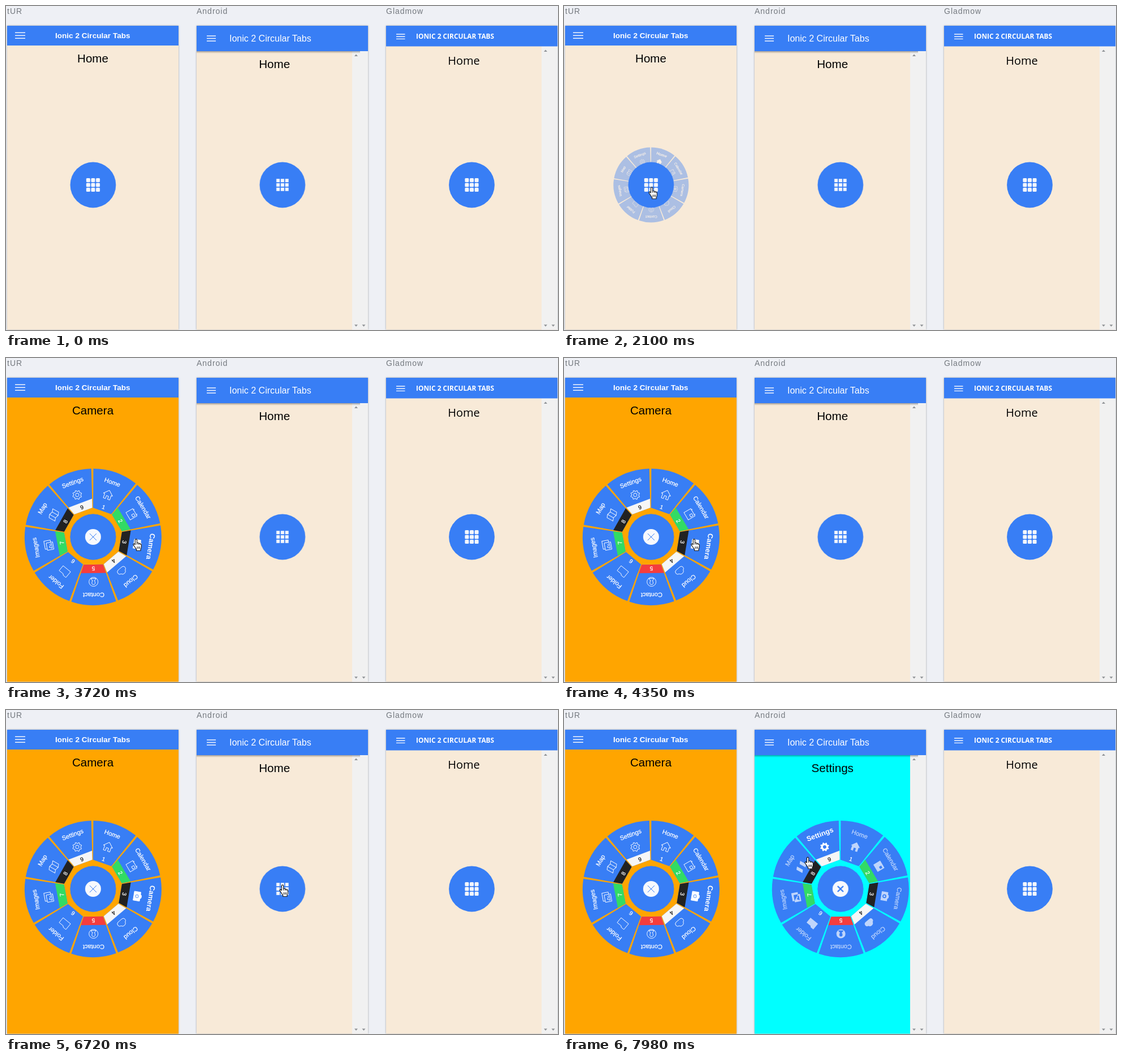
These frames come from a looping animation (976 by 574 pixels, 8 s). An HTML page:

```html
<!DOCTYPE html>
<html lang="en">
<head>
<meta charset="utf-8">
<title>Circular tabs</title>
<style>
html, body { margin: 0; width: 100%; height: 100%; overflow: hidden; background: #eef0f5; }
svg { display: block; width: 976px; height: 574px; }
text { font-family: "Liberation Sans", Arial, sans-serif; }
.name { font-size: 14px; letter-spacing: 1px; fill: #74797f; }
.phone { fill: #f8ead8; filter: drop-shadow(0 0 1.5px rgba(0, 0, 0, .35)); }
.bar, .disc, .slice { fill: #387ef5; }
.burger { stroke: #f2f6fe; fill: none; }
.title { fill: #fff; }
.head { font-size: 20.6px; text-anchor: middle; }
.open { font-family: "Open Sans", "Noto Sans", sans-serif; }
.scroll { fill: #f1f1f1; }
.arrow { fill: #8f9296; }
.grid { fill: #f3f6fc; }

.label, .num { fill: #fff; text-anchor: middle; }
.label { font-size: 11px; stroke: #fff; stroke-width: .25px; }
.num { font-size: 10px; stroke-width: .25px; }
.icon { fill: none; stroke: #fff; stroke-width: .9; stroke-linejoin: round; }
.mid .icon { fill: #fff; fill-rule: evenodd; stroke: none; }
.mid .idle { opacity: .68; }
.active .label { font-size: 12.6px; font-weight: 700; stroke: none; }
.active .icon { fill: #fff; fill-rule: evenodd; }

.wheel, .close, .was, .now, .hand { animation: 8s linear infinite; }
.close, .was, .now { animation-timing-function: step-end; }
.left .wheel { animation-name: wheel1; }
.left .close { animation-name: close1; }
.left .was { animation-name: was1; }
.left .now { animation-name: now1; }
.mid .wheel { animation-name: wheel2; }
.mid .close { animation-name: close2; }
.mid .was { animation-name: was2; }
.mid .now { animation-name: now2; }
.hand { animation-name: hand; }

@keyframes wheel1 {
  0%, 16.29%, 27.6%, 32.21% { transform: scale(.25); opacity: 0; }
  20.04%, 24.25%, 35.96%, 100% { transform: scale(1); opacity: 1; }
}
@keyframes wheel2 {
  0%, 70.81%, 83.9%, 87.6% { transform: scale(.25); opacity: 0; }
  74.56%, 80.85%, 91.35%, 100% { transform: scale(1); opacity: 1; }
}
@keyframes close1 {
  0%, 24.3% { visibility: hidden; }
  16.45%, 32.2%, 100% { visibility: visible; }
}
@keyframes close2 {
  0%, 80.9% { visibility: hidden; }
  70.85%, 87.7%, 100% { visibility: visible; }
}
@keyframes was1 { 0% { visibility: visible; } 46.5%, 100% { visibility: hidden; } }
@keyframes now1 { 0% { visibility: hidden; } 46.5%, 100% { visibility: visible; } }
@keyframes was2 { 0% { visibility: visible; } 97.875%, 100% { visibility: hidden; } }
@keyframes now2 { 0% { visibility: hidden; } 97.875%, 100% { visibility: visible; } }
@keyframes hand {
  0% { transform: translate(561px, -30px); }
  4% { transform: translate(561px, -30px); animation-timing-function: cubic-bezier(.35, .25, .4, 1); }
  13.9%, 16.4% { transform: translate(158px, 319px); }
  18%, 24.4% { transform: translate(157px, 320px); }
  27.4% { transform: translate(154px, 322px); }
  36% { transform: translate(154px, 322px); animation-timing-function: ease-in-out; }
  41.6% { transform: translate(230px, 321px); }
  57.6% { transform: translate(230px, 321px); animation-timing-function: ease-in-out; }
  67.5% { transform: translate(483px, 307px); }
  70.5% { transform: translate(489px, 310px); }
  91.25% { transform: translate(489px, 310px); animation-timing-function: ease-in-out; }
  95.25%, 100% { transform: translate(431px, 261px); }
}
</style>
</head>
<body>
<svg viewBox="0 0 976 574">
  <defs>
    <linearGradient id="shade" x2="0" y2="1">
      <stop stop-opacity=".32"/>
      <stop offset="1" stop-opacity="0"/>
    </linearGradient>
  </defs>

  <text class="name" x="2" y="13.5">tUR</text>
  <text class="name" x="337" y="13.5">Android</text>
  <text class="name" x="672" y="13.5">Gladmow</text>

  <g class="left">
    <rect class="phone" x="2" y="35" width="303" height="538.5"/>
    <text class="head" x="153.5" y="100">Home</text>
    <g class="now">
      <rect x="2" y="70" width="303" height="503.5" fill="#ffa500"/>
      <text class="head" x="153.5" y="100">Camera</text>
    </g>
    <rect class="bar" x="2" y="35" width="303" height="35"/>
    <path class="burger" stroke-width="1.6" d="M16 47.3h18M16 52.3h18M16 57.3h18"/>
    <text class="title" x="153.3" y="56.5" font-size="13.6" font-weight="700" text-anchor="middle">Ionic 2 Circular Tabs</text>
    <g id="tabs1" transform="translate(153.9 317)"></g>
  </g>

  <g class="mid">
    <rect class="phone" x="337" y="35" width="303" height="538.5"/>
    <text class="head" x="474.7" y="110">Home</text>
    <g class="now">
      <rect x="337" y="80" width="275" height="493.5" fill="#0ff"/>
      <text class="head" x="474.7" y="110">Settings</text>
    </g>
    <rect class="scroll" x="612" y="80" width="28" height="493.5"/>
    <rect x="337" y="80" width="289" height="4" fill="url(#shade)"/>
    <rect class="bar" x="337" y="35" width="303" height="45"/>
    <path class="burger" stroke-width="1.6" d="M355 53h16M355 57.5h16M355 62h16"/>
    <text class="title" x="395" y="63" font-size="16">Ionic 2 Circular Tabs</text>
    <path class="arrow" d="M616 89l3-3.5 3 3.5zM616 564.5l3 3.5 3-3.5zM629.5 564.5l3 3.5 3-3.5z"/>
    <g id="tabs2" transform="translate(488.8 317)"></g>
  </g>

  <g class="right">
    <rect class="phone" x="672" y="35" width="303" height="538.5"/>
    <text class="head open" x="809.5" y="103.5" style="font-size:20px;font-weight:500">Home</text>
    <rect class="scroll" x="947" y="71" width="28" height="502.5"/>
    <rect class="bar" x="672" y="35" width="303" height="36.5"/>
    <path class="burger" stroke-width="1.4" d="M690 50h15.5M690 54.2h15.5M690 58.4h15.5"/>
    <text class="title open" x="725" y="58" font-size="11.9" font-weight="700">IONIC 2 CIRCULAR TABS</text>
    <path class="arrow" d="M951 81l3-3.5 3 3.5zM951 564.5l3 3.5 3-3.5zM964.5 564.5l3 3.5 3-3.5z"/>
    <g id="tabs3" transform="translate(823.5 317)"></g>
  </g>

  <g class="hand">
    <path fill="#fff" stroke="#111" stroke-width="1.1" stroke-linejoin="round" d="M-1.6 1.5a1.6 1.6 0 0 1 3.2 0v5.3q2.6-.9 3 .7 2-.6 2.6.8 2.2-.3 2.2 1.6v3.6q0 2.5-1.3 3.9v2.9h-7.5v-2.4q-2-2.2-3-4.4l-2.4-3.4q-.6-1.9 1.3-2 1 .2 1.9 1.5z"/>
    <path fill="none" stroke="#111" stroke-width=".9" d="M1.6 6.8v3M4.6 7.5v2.5M7.2 8.3v2M2 13v4M4.3 13v4M6.5 13v4"/>
  </g>
</svg>
<script>
const byId = id => document.getElementById(id);
const ring = (r, y = 0) => `M${-r} ${y}a${r} ${r} 0 1 1 ${2 * r} 0a${r} ${r} 0 1 1 ${-2 * r} 0z`;

const gear = 'M' + Array.from({ length: 32 }, (_, i) => {
  const r = i % 4 < 2 ? 8 : 6.2, a = (i - .5) * Math.PI / 16;
  return `${(r * Math.sin(a)).toFixed(2)} ${(-r * Math.cos(a)).toFixed(2)}`;
}).join('L') + 'z';

const blue = '#387ef5', green = '#32db64', dark = '#222', light = '#f6f6f6', red = '#f53d3d';

const items = [
  ['Home', blue, 'M-8.5 0L0-8l8.5 8H6v8H2V2.5H-2V8H-6V0z'],
  ['Calendar', green, 'M-7.5-6.5h15v14h-15zM1-3.5h4.5v4.5h-4.5zM-5-8.5v3M5-8.5v3'],
  ['Camera', dark, 'M-8-5h4l2-2h4l2 2h4v11.5h-16z' + ring(3.4, .8) + ring(1.7, .8)],
  ['Cloud', light, 'M-4.5 6a4 4 0 0 1-.8-7.8a5.5 5.5 0 0 1 10.3-.7a4.3 4.3 0 0 1 0 8.5z'],
  ['Contact', red, ring(8) + 'M-4.5 6q.5-3 3-3.5-3.5-7 1.5-7.5 5 .5 1.5 7.5 2.5.5 3 3.5z'],
  ['Folder', blue, 'M-8.5-6.5h6l2 2h9v11h-17z'],
  ['Images', green, 'M-8.5-4h13v11.5h-13zM-6-4v-3.5h14.5v11.5h-4M-6.5 5l3-5 2.5 3 1.5-1.5 2 3.5z'],
  ['Map', dark, 'M-8.5-5l5.5-2 6 2 5.5-2v12l-5.5 2-6-2-5.5 2zM-3-7l6 2v12l-6-2z'],
  ['Settings', light, gear + ring(3)]
];

// One slice points straight up, then is turned into place.
const half = 19.15 * Math.PI / 180, t = Math.tan(half);
const ox = 121 * Math.sin(half), oy = 121 * Math.cos(half);
const slice = `M${-49 * t}-49L${-ox} ${-oy}A121 121 0 0 1 ${ox} ${-oy}L${49 * t}-49z`;
const badge = `M${-49 * t}-49L${-64 * t}-64H${64 * t}L${49 * t}-49z`;

const face = ([name, , icon], cls) => `<g class="${cls}">
  <text class="label" y="-99">${name}</text>
  <path class="icon" transform="translate(0 -79.5)" d="${icon}"/></g>`;

function wheel(next) {
  return '<g class="wheel">' + items.map((item, i) => {
    const color = item[1], ink = color === light ? '#222' : '#fff';
    const faces = i === 0 ? face(item, 'was active') + face(item, 'now idle')
      : item[0] === next ? face(item, 'was idle') + face(item, 'now active')
      : face(item, 'idle');
    return `<g transform="rotate(${19.4 + 40 * i})">
      <path class="slice" d="${slice}"/><path fill="${color}" d="${badge}"/>
      <text class="num" y="-52.5" style="fill:${ink};stroke:${ink}">${i + 1}</text>${faces}</g>`;
  }).join('') + '</g>';
}

function button(size, step, round) {
  let cells = '';
  for (let i = 0; i < 9; i++) {
    const x = (i % 3 - 1) * step - size / 2, y = (Math.floor(i / 3) - 1) * step - size / 2;
    cells += `<rect x="${x}" y="${y}" width="${size}" height="${size}" rx="${round}"/>`;
  }
  return `<circle class="disc" r="40.4"/><g class="grid">${cells}</g>`;
}

const close = (r, width) => `<g class="close"><circle class="disc" r="40.4"/>
  <circle r="14" fill="#f7f9fd"/>
  <path stroke="${blue}" stroke-width="${width}" d="M${-r} ${-r}L${r} ${r}M${r} ${-r}L${-r} ${r}"/></g>`;

byId('tabs1').innerHTML = wheel('Camera') + button(7, 8.6, 1.5) + close(6, 1);
byId('tabs2').innerHTML = wheel('Settings') + button(6, 7.8, 0) + close(5, 2.4);
byId('tabs3').innerHTML = button(7, 8.6, 1.5);
</script>
</body>
</html>
```
